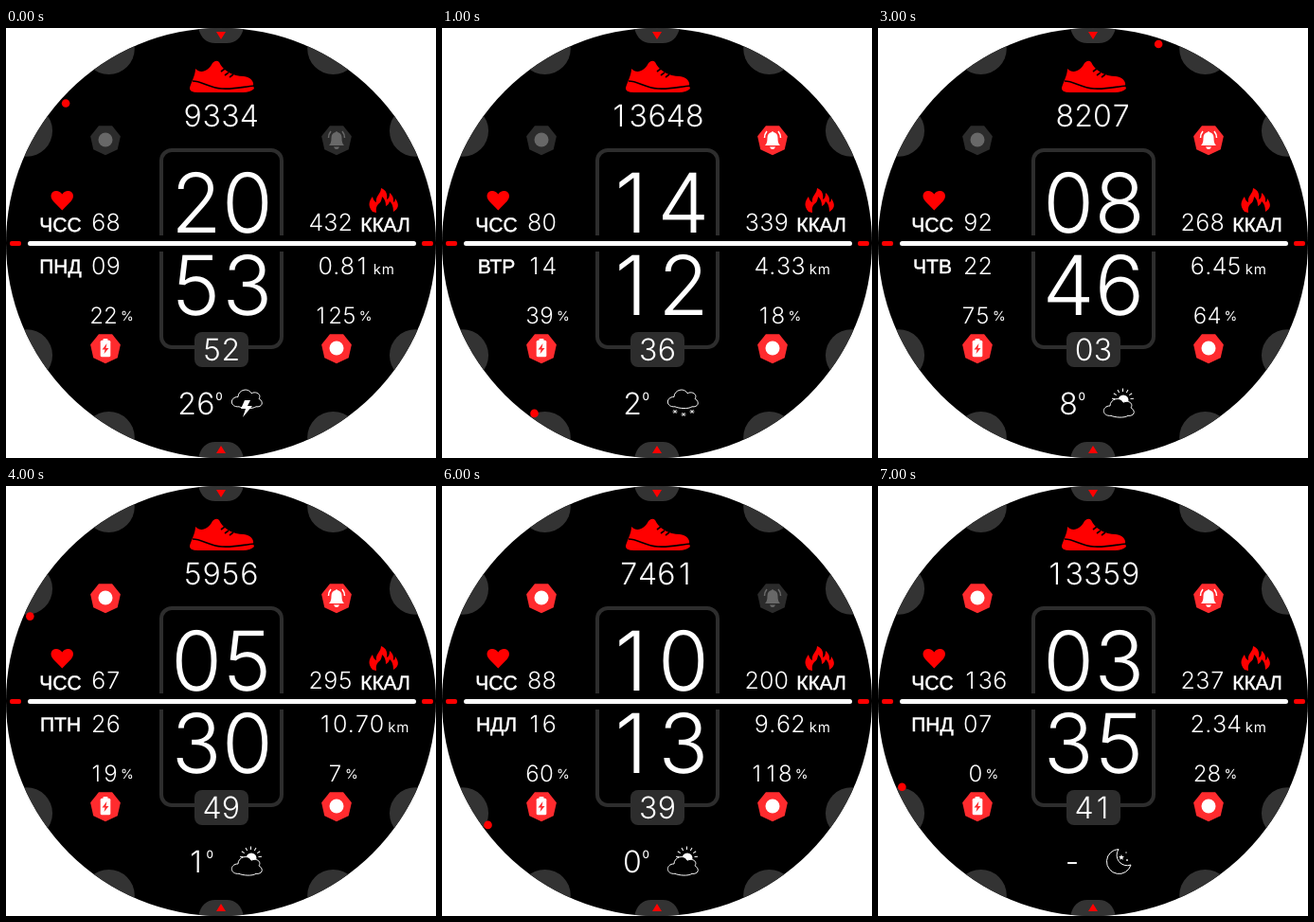
Write an HTML page with a canvas that moves like this. It is 454x454 px and loops after 8000 ms.

```html
<!DOCTYPE html>
<html lang="ru">
<head>
<meta charset="utf-8">
<style>
html, body { margin: 0; width: 100%; height: 100%; overflow: hidden; background: #fff; }
canvas { display: block; width: 454px; height: 454px; }
</style>
</head>
<body>
<canvas id="face" width="454" height="454"></canvas>
<script>
const ctx = document.getElementById('face').getContext('2d');
ctx.textRendering = 'geometricPrecision';
const RED = '#f00', BADGE = '#ff2b2e', GRAY = '#333', DIAL = '#2d2d2d', WHITE = '#fff';
const MID = 227, STEP = 1000, TAU = Math.PI * 2;

const states = [
  { steps: '9334', hour: '20', min: '53', sec: 52, pulse: '68', kcal: '432', day: 'ПНД', date: '09',
    dist: '0.81', battery: '22', score: '125', temp: '26', sky: 'storm', link: 0, bell: 0 },
  { steps: '13648', hour: '14', min: '12', sec: 36, pulse: '80', kcal: '339', day: 'ВТР', date: '14',
    dist: '4.33', battery: '39', score: '18', temp: '2', sky: 'snow', link: 0, bell: 1 },
  { steps: '2384', hour: '03', min: '29', sec: 19, pulse: '144', kcal: '202', day: 'СРД', date: '01',
    dist: '2.30', battery: '96', score: '3', temp: '-5', sky: 'wind', link: 0, bell: 0 },
  { steps: '8207', hour: '08', min: '46', sec: 3, pulse: '92', kcal: '268', day: 'ЧТВ', date: '22',
    dist: '6.45', battery: '75', score: '64', temp: '8', sky: 'sun', link: 0, bell: 1 },
  { steps: '5956', hour: '05', min: '30', sec: 49, pulse: '67', kcal: '295', day: 'ПТН', date: '26',
    dist: '10.70', battery: '19', score: '7', temp: '1', sky: 'sun', link: 1, bell: 1 },
  { steps: '9048', hour: '22', min: '58', sec: 23, pulse: '74', kcal: '386', day: 'СБТ', date: '18',
    dist: '10.24', battery: '83', score: '52', temp: '4', sky: 'snow', link: 1, bell: 1 },
  { steps: '7461', hour: '10', min: '13', sec: 39, pulse: '88', kcal: '200', day: 'НДЛ', date: '16',
    dist: '9.62', battery: '60', score: '118', temp: '0', sky: 'sun', link: 1, bell: 0 },
  { steps: '13359', hour: '03', min: '35', sec: 41, pulse: '136', kcal: '237', day: 'ПНД', date: '07',
    dist: '2.34', battery: '0', score: '28', temp: '-', sky: 'moon', link: 1, bell: 1 }
];

const shoe = 'M200 43C206 49 214 45 218 37Q222 33 225 36C229 45 240 51 251 51C258 52 262 56 261 61L262 64Q258 68 250 68L203 68Q193 68 194 63C196 56 200 50 200 43Z';
const shoeSeams = 'M197 56C207 56 214 63 228 64C240 65 251 62 262 61M231 43l-4 3M235 47l-4 3M240 49l-4 3';
const heart = 'M59.3 192.5L50 183C45.5 178 47.5 172 53 172Q57 172 59.3 175.5Q61.5 172 65.5 172C71 172 73 178 68.6 183Z';
const flame = 'M387 194C381 187 384 182 387 178Q388 183 391 184C390 177 396 175 396 169C402 171 403 177 402 181Q405 180 405 174C410 178 409 182 409 184Q411 183 411 180C416 187 414 191 409 194Q409 186 405 183Q404 187 401 188Q401 181 397 178Q397 183 393 186Q390 189 391 195Z';
const cloudShape = 'M8 20C-2 21-2 9 7 9C7 1 18-2 21 5C27 2 32 7 29 11C35 15 32 21 26 20C22 23 12 22 8 20Z';
const bellShape = 'M-8 6Q-5.5 4-5.5-2Q-5.5-7-1-8Q0-10 1-8Q5.5-7 5.5-2Q5.5 4 8 6ZM-3 7.5H3Q2 10 0 10Q-2 10-3 7.5Z';
const bellWaves = 'M-6-9Q-8.5-6-8.5-2M6-9Q8.5-6 8.5-2';

function fill(path, color) {
  ctx.fillStyle = color;
  ctx.fill(new Path2D(path));
}

function stroke(path, color, width) {
  ctx.strokeStyle = color;
  ctx.lineWidth = width;
  ctx.stroke(new Path2D(path));
}

function disc(x, y, r, color) {
  ctx.fillStyle = color;
  ctx.beginPath();
  ctx.arc(x, y, r, 0, TAU);
  ctx.fill();
}

function box(x, y, w, h, r, color) {
  ctx.fillStyle = color;
  ctx.beginPath();
  ctx.roundRect(x, y, w, h, r);
  ctx.fill();
}

function at(x, y, draw) {
  ctx.save();
  ctx.translate(x, y);
  draw();
  ctx.restore();
}

// Enlarging a 16px font keeps its wider text design at every size.
function type(text, x, y, size, weight, align = 'left') {
  at(x, y, () => {
    ctx.scale(size / 16, size / 16);
    ctx.font = `${weight} 16px Inter, sans-serif`;
    ctx.textAlign = align;
    ctx.fillStyle = WHITE;
    ctx.fillText(text, 0, 0);
  });
}

const cell = (c, size) => size * (c === '.' ? 0.31 : c === '-' ? 0.5 : 0.62);
const numberWidth = (text, size) => [...text].reduce((sum, c) => sum + cell(c, size), 0);

// Tabular digits; returns the right edge.
function number(text, x, y, size) {
  for (const c of text) {
    const w = cell(c, size);
    type(c, x + w / 2 - (c === '1' ? size * 0.015 : 0), y, size, 320, 'center');
    x += w;
  }
  return x;
}

function centered(text, x, y, size, extra = 0) {
  return number(text, x - (numberWidth(text, size) + extra) / 2, y, size);
}

function percent(text, x) {
  const end = centered(text, x, 311.5, 24, 16);
  type('%', end + 3, 308.5, 14, 400);
}

function label(text, x, y) {
  ctx.font = '21px "Liberation Sans", Arial, sans-serif';
  ctx.textAlign = 'center';
  ctx.fillStyle = ctx.strokeStyle = WHITE;
  ctx.lineWidth = 0.5;
  ctx.fillText(text, x, y);
  ctx.strokeText(text, x, y);
}

function badge(x, y, on, glyph) {
  at(x, y, () => {
    ctx.fillStyle = on ? BADGE : '#2b2b2b';
    ctx.beginPath();
    for (let i = 0; i < 7; i++) {
      const a = i * TAU / 7;
      ctx.lineTo(16.3 * Math.sin(a), 16.3 * Math.cos(a));
    }
    ctx.fill();
    glyph(on ? WHITE : '#686868');
  });
}

function bell(color) {
  fill(bellShape, color);
  stroke(bellWaves, color, 1.5);
}

function battery(color) {
  box(-2.5, -10, 5, 4, 1, color);
  box(-5.3, -8.3, 10.6, 17.5, 1.5, color);
  fill('M1.5-5L-3.5 1.5H-.5L-1.5 6L3.5 0H.5Z', BADGE);
}

const mark = color => disc(0, 0, 7.5, color);

function cloud(x, y, scale = 1) {
  at(x, y, () => {
    ctx.scale(scale, scale * 0.94);
    fill(cloudShape, '#000');
    stroke(cloudShape, WHITE, 1 / scale);
  });
}

const skies = {
  storm() {
    cloud(238, 381);
    fill('M252 393L248 402H253L250 411L260 399H255L258 393Z', WHITE);
  },
  snow() {
    cloud(238, 381);
    for (const [x, y] of [[246, 405], [255, 408], [264, 405]]) {
      at(x, y, () => stroke('M-2.5 0H2.5M-1.5-2L1.5 2M1.5-2L-1.5 2', WHITE, 0.8));
    }
  },
  wind() {
    cloud(245, 386, 0.8);
    fill('M237 395H251V405H237Z', '#000');
    stroke('M238 396H250Q254 396 253 393M238 399H256Q260 399 258 396M240 402H250Q254 402 252 405', WHITE, 1);
  },
  sun() {
    disc(259, 393, 5.5, WHITE);
    for (let i = -3; i <= 3; i++) {
      at(258.5, 392, () => {
        ctx.rotate(i * 0.5);
        stroke('M0-8V-11.5', WHITE, 1);
      });
    }
    cloud(238, 390.5);
  },
  moon() {
    stroke('M254 383.5A13 13 0 1 0 267 400A11 11 0 0 1 254 383.5Z', WHITE, 1);
    fill('M257 389l.8 2 2.2.2-1.7 1.4.6 2.2-1.9-1.2-1.9 1.2.6-2.2-1.7-1.4 2.2-.2Z', WHITE);
    disc(263, 395, 0.9, WHITE);
    disc(262, 387, 0.7, WHITE);
  }
};

function rim() {
  for (let i = 0; i < 12; i++) {
    if (i % 3 === 0) continue;
    const a = i * TAU / 12;
    disc(MID + 237 * Math.sin(a), MID - 237 * Math.cos(a), 27.3, GRAY);
  }
  fill('M203 0Q207 16 221 16H233Q247 16 251 0Z', GRAY);
  fill('M203 454Q207 437 221 437H233Q247 437 251 454Z', GRAY);
  fill('M222 4H232L227 12Z', RED);
  fill('M222 449H232L227 441Z', RED);
  box(4, 225, 12, 5, 2, RED);
  box(439, 225, 12, 5, 2, RED);
}

function dial() {
  ctx.strokeStyle = DIAL;
  ctx.lineWidth = 4;
  ctx.beginPath();
  ctx.roundRect(164, 129, 127, 208, 11);
  ctx.stroke();
  ctx.fillStyle = '#000';
  ctx.fillRect(160, 219, 136, 17);
  box(23, 225, 410, 5, 2.5, WHITE);
  box(199, 321, 57, 37, 8, DIAL);
}

function temperature(text) {
  if (text === '-') {
    centered(text, 205, 408, 32);
    return;
  }
  const end = centered(text, 205, 408, 32, 8);
  type('0', end + 0.5, 393, 11.5, 450);
}

function draw(s) {
  ctx.fillStyle = WHITE;
  ctx.fillRect(0, 0, 454, 454);
  ctx.save();
  ctx.beginPath();
  ctx.arc(MID, MID, 227, 0, TAU);
  ctx.clip();
  ctx.fillStyle = '#000';
  ctx.fillRect(0, 0, 454, 454);
  rim();
  dial();

  fill(shoe, RED);
  stroke(shoeSeams, '#000', 1.6);
  fill(heart, RED);
  fill(flame, RED);

  centered(s.steps, MID, 104, 32);
  centered(s.hour, 228, 215.5, 87);
  centered(s.min, 228, 302.5, 87);
  centered(String(s.sec).padStart(2, '0'), 227.5, 350.5, 32);

  label('ЧСС', 57.5, 214.5);
  label('ККАЛ', 400.5, 214.5);
  label(s.day, 57.5, 259);
  number(s.pulse, 90, 214, 25);
  number(s.kcal, 319.5, 214, 25);
  number(s.date, 90, 260, 25);
  const end = number(s.dist, 329.5, 260, 25);
  ctx.letterSpacing = '0.8px';
  type('km', end + 4, 260, 15, 400);
  ctx.letterSpacing = '0px';
  percent(s.battery, 111);
  percent(s.score, 355.5);

  badge(105, 118, s.link, mark);
  badge(349, 118, s.bell, bell);
  badge(105, 338, 1, battery);
  badge(349, 338, 1, mark);

  temperature(s.temp);
  skies[s.sky]();

  const a = s.sec * TAU / 60;
  disc(227.7 + 221.5 * Math.sin(a), 227.7 - 221.5 * Math.cos(a), 4.3, RED);
  ctx.restore();
}

function frame() {
  draw(states[Math.floor(performance.now() / STEP) % states.length]);
  requestAnimationFrame(frame);
}
frame();
</script>
</body>
</html>
```
